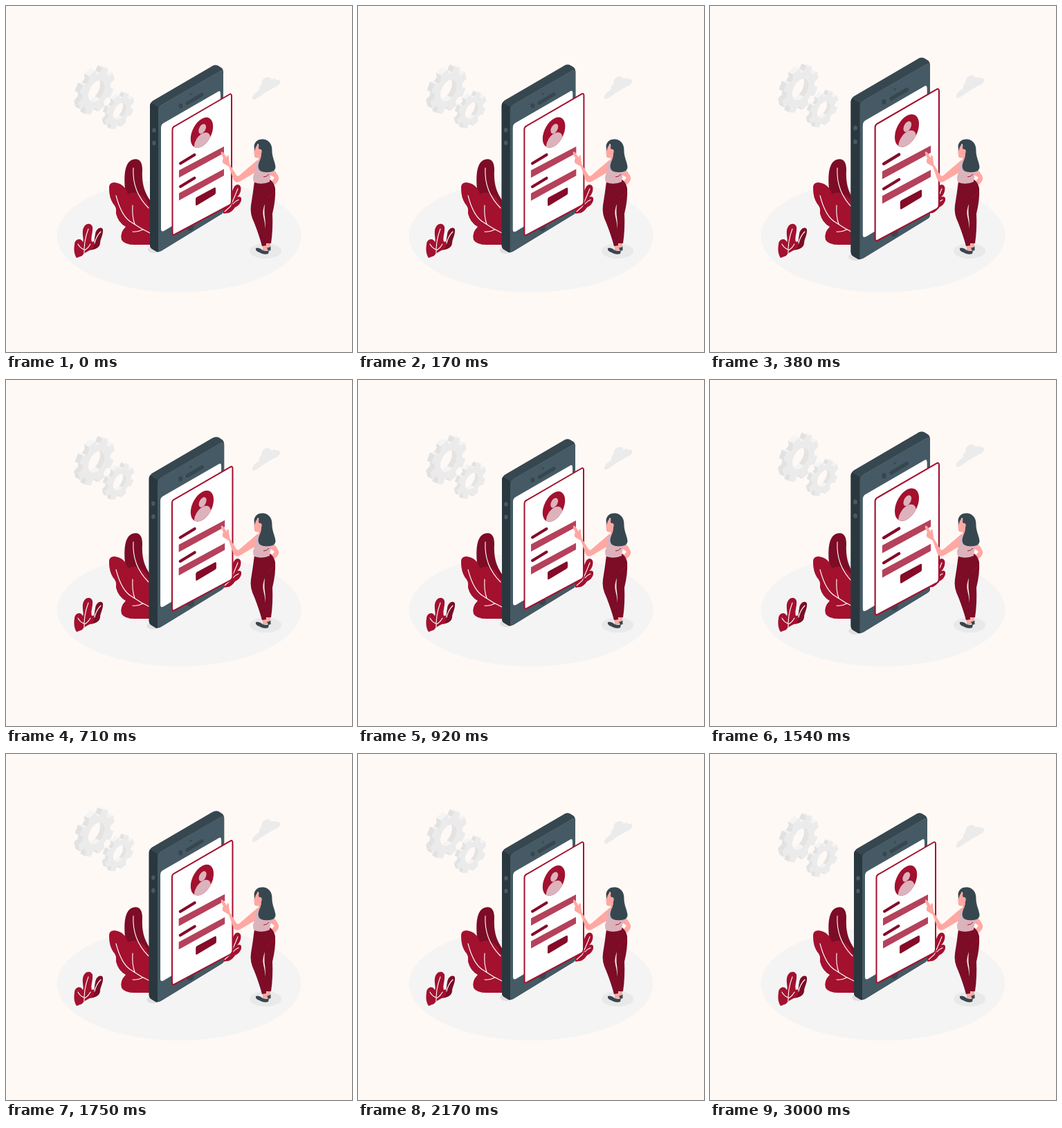
These frames come from a looping animation (500x500 px, 3.04 s). An HTML page:

```html
<!DOCTYPE html>
<html lang="en">
<head>
<meta charset="utf-8">
<title>Sign-up illustration</title>
<style>
  html, body { margin: 0; width: 100%; height: 100%; overflow: hidden; background: #fff9f6; }
  svg { display: block; width: 100%; height: 100%; }
  .red { fill: #a3112f; }
  .wine { fill: #7d0c26; }
  .skin { fill: #ffa8a3; }
  .slate { fill: #37474f; }
  .vein { fill: none; stroke: #fff; stroke-width: 1.1; stroke-linecap: round; }
</style>
</head>
<body>
<svg viewBox="0 0 500 500">
  <ellipse cx="250" cy="332" rx="176.5" ry="82" fill="#f4f4f4"/>
  <g id="sky">
    <g id="gears"></g>
    <path fill="#ebebeb" d="M356 135Q355 130 360 126L366 121Q365 116 369 114Q369 105 376 103Q382 102 384 107Q388 103 391 107Q396 105 396.500 111L393 115Q377 123 365 132Q358 137 356 135Z"/>
  </g>

  <!-- Tall plant -->
  <path class="wine" d="M173 272C170 250 170 226 183 222C192 219 197 225 197 236C196 255 199 268 209 282V310H180Z"/>
  <path class="red" d="M149 264Q148 255 157 255Q172 257 176 272Q188 267 194 273Q202 275 206 288L214 291V345H190Q172 346 167 338Q164 328 173 319Q162 313 159 300Q160 290 155 286Q149 277 149 264Z"/>
  <path class="vein" d="M184 234Q182 268 206 292M159 274Q167 305 182 313Q195 322 208 328M183 288Q182 305 186 315M183 326Q190 327 198 323"/>

  <!-- Short plants -->
  <path class="wine" d="M121 353C129 346 127 338 129 330C130 321 138 318 140 323C141 330 136 337 136 343C135 350 128 352 121 353Z"/>
  <path class="red" d="M102 364C98 358 98 350 99 345C99 337 108 334 111 341C113 338 110 332 111 324C113 314 122 312 125 319C126 327 122 334 124 341C128 338 129 345 126 350C120 354 113 356 110 361Z"/>
  <path class="vein" d="M119 322Q112 340 113 361M104 344Q107 350 113 352M137 326Q130 333 128 343M122 344Q118 351 113 353"/>
  <path class="red" d="M314 300V288L326 271Q329 258 335 258Q341 259 339 268Q337 274 334 276Q341 274 340 281Q338 288 331 291Q327 297 322 299Z"/>
  <path class="vein" d="M335 264Q329 279 324 290L316 297M336 280Q331 282 328 286"/>

  <g id="phone">
    <ellipse cx="214" cy="352" rx="9" ry="5" fill="#e0e0e0"/>
    <path class="slate" d="M208 145Q208 140 212 137L296 88Q301 84 306 86L311 89Q314 91 314 96V296Q314 299.500 310 301.500L225 353.500Q220 356.500 216 354L211 351Q208 349 208 345Z"/>
    <path fill="#2a373e" d="M208 145Q208 141 210 140L221 147L220 355.500Q218 355.500 216 354L211 351Q208 349 208 345Z"/>
    <path fill="#455a64" d="M220 152Q220 146 225 143L308 95Q314 91 314 98V296Q314 299.500 310 301.500L225 353.500Q220 356.500 220 351Z"/>
    <path fill="none" stroke="#566a73" stroke-width=".7" d="M220.500 149Q221 146 225 143L308 95Q313 92 314 96"/>
    <g fill="#455a64">
      <ellipse cx="214" cy="179.500" rx="2.7" ry="3.300"/>
      <ellipse cx="214" cy="198" rx="2.7" ry="3.300"/>
    </g>
    <path fill="#fff" d="M224 176Q224 171 228 169L306 124Q310 121 310 127V276L230 324Q224 328 224 322Z"/>
    <g class="slate">
      <ellipse cx="252.500" cy="144.500" rx="3" ry="3.600"/>
      <circle cx="267" cy="127.500" r="1.5"/>
      <ellipse cx="266" cy="319" rx="5.500" ry="6"/>
    </g>
    <path stroke="#37474f" stroke-width="5" stroke-linecap="round" d="M262 140.500L283 128"/>

    <path fill="#fff" stroke="#a3112f" stroke-width="2" d="M240.500 179Q240.500 175 244 173.500L322.500 128Q326 126 326 130V282Q326 286 323.500 287.500L244 330Q240.500 332 240.500 327Z"/>
    <g transform="matrix(1 -.55 0 1 283 183)">
      <clipPath id="disc"><ellipse rx="16.200" ry="20"/></clipPath>
      <ellipse class="red" rx="16.200" ry="20"/>
      <g fill="#dcb3bc" clip-path="url(#disc)">
        <ellipse cx=".7" cy="-5" rx="5.400" ry="6.500"/>
        <ellipse cx=".5" cy="14.500" rx="11.800" ry="13"/>
      </g>
    </g>
    <path fill="#b5415b" d="M250 237.500L315 203V212.500L250 248ZM250 270.500L315 235.500V245L250 281Z"/>
    <path stroke="#850b28" stroke-width="4" stroke-linecap="round" d="M252 227.500L272.500 215M252 261L272.500 248.500"/>
    <path fill="#850b28" d="M274 279Q274 277 276 276L301 262.500Q303 261.500 303 264V270Q303 272 301 273L276 288Q274 289 274 287Z"/>
  </g>

  <!-- Woman -->
  <ellipse cx="375" cy="354" rx="23" ry="11" fill="#e9e9e9"/>
  <path class="skin" d="M371 344H377L378 353L371 354ZM377 340H382V350H378Z"/>
  <path class="slate" d="M361 350Q366 348 371 353Q376 355 380 353L379 358Q372 360 366 356Q360 354 361 350ZM377 349Q380 350 382.500 347.500V353L379 354Z"/>
  <path class="skin" d="M383 235Q391 238 394.500 249Q393 256 387 259L382 256L388 248L381 243Z"/>
  <path class="wine" d="M359 253Q370 258 382 251Q387 255 389 263Q390 280 385 300Q386 323 383 343H376V346L370 347Q366 332 359 314Q352 300 354 288Q357 270 359 253Z"/>
  <path fill="#f4f4f4" d="M374 286Q370 297 372 304Q374 312 375 322Q375 310 373.500 302Q373 294 374 286Z"/>
  <path fill="none" stroke="#a3112f" stroke-width=".8" d="M387 268Q384 275 377 277"/>
  <path class="skin" d="M364 222L358 227L337 245Q334 247 332 243L323.500 229Q322 222 322 217Q320 213 319 219L313.500 211Q310 209 311 214L314 220Q311 225 315 228L322 232L329 252Q333 257 339 253L361 240L372 230Z"/>
  <path fill="#dcb3bc" d="M363 224Q358 229 360 237L357 247Q357 254 359 255Q370 259 381 254Q381 247 385 240Q388 238 386 233L368 230Z"/>
  <path fill="none" stroke="#a3112f" d="M372 247Q377 247 380 243"/>
  <path class="skin" d="M361 200Q358 208 358.500 212L359 218Q362 221 365 219V224Q368 229 372 225V203Z"/>
  <path class="slate" d="M358.500 202C360 195 365 192 372 192.500C382 194 385 202 384.500 211C385 219 389 226 389.500 233C389 238 385 240 379 240Q371 241 366 237Q363 232 366 225Q370 217 369 208L365 206Q366 200 364 199Q361 203 359 209.500Z"/>
  <ellipse class="skin" cx="367.500" cy="210" rx="2.200" ry="3"/>
</svg>
<script>
const LOOP = 3040, BEAT = 1040;
const $ = id => document.getElementById(id);

const polygon = points => `M${points.map(p => p.map(v => v.toFixed(2)).join(" ")).join("L")}Z`;

// Side faces of an outline pushed back by (dx, dy); upward ones are lighter
function walls(points, dx, dy) {
  return points.map((p, i) => {
    const q = points[(i + 1) % points.length];
    const nx = q[1] - p[1], ny = p[0] - q[0];
    if (nx * dx + ny * dy <= 0) return "";
    const quad = [p, q, [q[0] + dx, q[1] + dy], [p[0] + dx, p[1] + dy]];
    return `<path fill="${-ny > Math.abs(nx) ? "#f4f4f4" : "#e2e2e2"}" d="${polygon(quad)}"/>`;
  }).join("");
}

// Toothed wheel lying in the same slanted plane as the phone
function gear(cx, cy, a, b, depth) {
  const at = (angle, r) => {
    const x = a * r * Math.cos(angle), y = b * r * Math.sin(angle);
    return [cx + x, cy + y - 0.55 * x];
  };
  const rim = [], hole = [];
  for (let i = 0; i < 8; i++) {
    const mid = i * Math.PI / 4 + 0.52;
    for (const [d, r] of [[-0.27, 0.78], [-0.18, 1], [0.18, 1], [0.27, 0.78]]) rim.push(at(mid + d, r));
  }
  for (let i = 32; i > 0; i--) hole.push(at(i * Math.PI / 16, 0.46));
  const dx = -depth, dy = -depth / 2;
  return walls(rim, dx, dy) + walls(hole, dx, dy) +
    `<path fill="#ebebeb" fill-rule="evenodd" d="${polygon(rim) + polygon(hole)}"/>`;
}

$("gears").innerHTML = gear(131, 123, 26, 31, 7) + gear(164.5, 152, 21, 23.5, 5);

// One beat: accelerating growth, then an even return and a rest
function beat(p) {
  if (p < 130 || p > 800) return 0;
  return p < 425 ? ((p - 130) / 295) ** 1.4 : (800 - p) / 375;
}

function draw(now) {
  const t = now % LOOP;
  const lift = 10 * (1 - Math.abs(1 - 2 * t / LOOP));
  const size = 1 + 0.1 * (t < 2 * BEAT ? beat(t % BEAT) : 0);
  $("sky").setAttribute("transform", `translate(0 ${-lift})`);
  $("phone").setAttribute("transform", `translate(264 220) scale(${size}) translate(-264 -220)`);
  requestAnimationFrame(draw);
}
requestAnimationFrame(draw);
</script>
</body>
</html>
```
